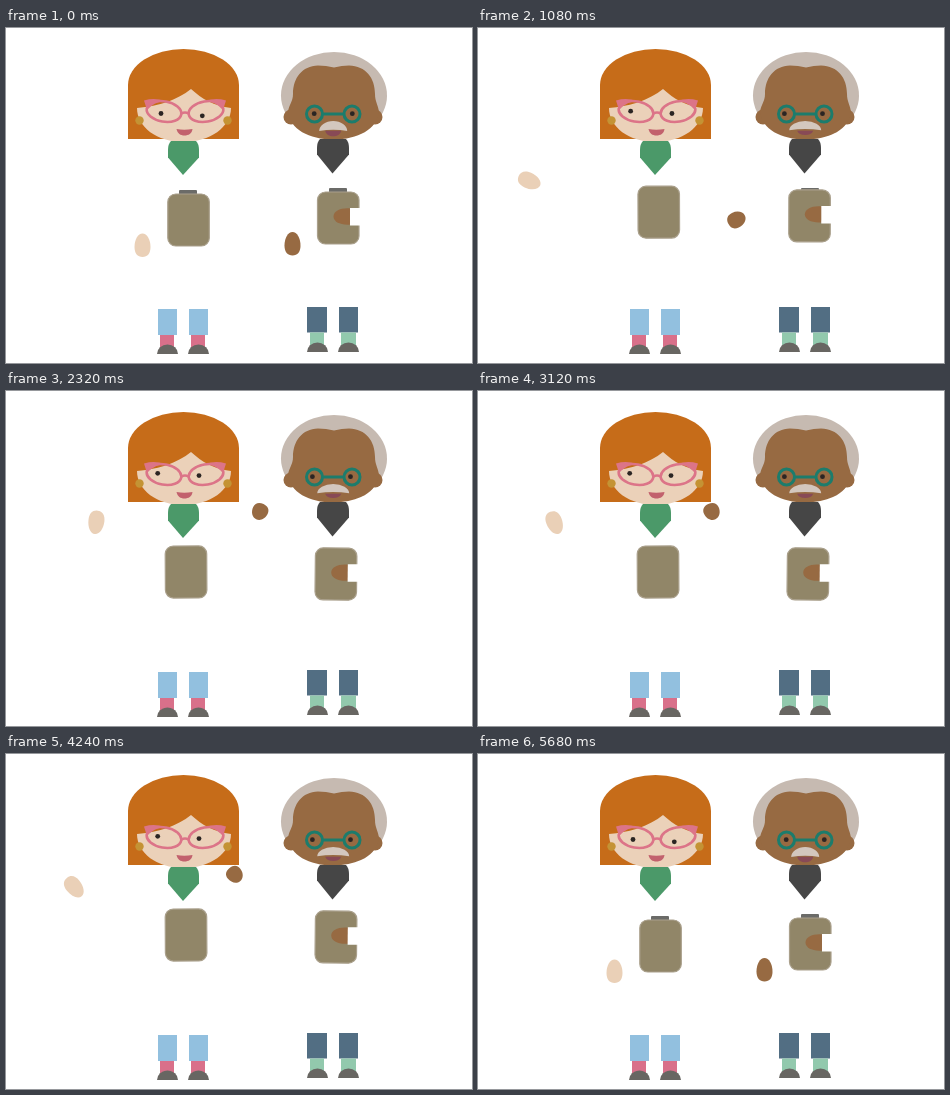
An HTML page for the animation above (6000 ms loop, 466 by 335 pixels).

```html
<!DOCTYPE html>
<html lang="en">
<head>
<meta charset="utf-8">
<title>Waving pair</title>
<style>
html, body { margin: 0; width: 100%; height: 100%; overflow: hidden; background: #fff; }
svg { display: block; width: 466px; height: 335px; }
</style>
</head>
<body>
<svg viewBox="0 0 466 335">
  <defs>
    <path id="hand" d="M0-12C4.500-12 8-6 8 1.500C8 8 5 11.500 0 11.500S-8 8-8 1.500C-8-6-4.500-12 0-12Z"/>
    <path id="shoe" d="M0 9.500A10.500 9.500 0 0 1 21 9.500Z" fill="#686662"/>
    <rect id="bag" width="41.500" height="52" rx="8" fill="#918668" stroke="#aaa08c" stroke-width="1.200"/>
    <rect id="tab" width="18" height="7" rx="1" fill="#6b6b68"/>
    <g id="lens">
      <ellipse cx="158" cy="83.500" rx="17.500" ry="10.200" transform="rotate(10 158 83.500)" fill="none" stroke="#dc7488" stroke-width="2.600"/>
      <path d="M138 72.500Q149 69.500 158 73Q148 74 141 82Z" fill="#dc7488"/>
    </g>
  </defs>

  <g id="woman">
    <path fill="#c66c19" d="M122 111V57A55.500 36 0 0 1 233 57V111Z"/>
    <path fill="#ebd1b9" d="M185 61C171 72 154 78 131 80C131 99 151 114 177.500 114S225 99 225 80C208 78 196 71 185 61Z"/>
    <g fill="#c49334"><circle cx="133.500" cy="92.500" r="4.200"/><circle cx="221.500" cy="92.500" r="4.200"/></g>
    <g id="womanEyes" fill="#2b2523"><circle cx="155" cy="85.500" r="2.400"/><circle cx="196.300" cy="87.800" r="2.400"/></g>
    <use href="#lens"/><use href="#lens" transform="translate(358 0) scale(-1 1)"/>
    <path fill="none" stroke="#dc7488" stroke-width="2.400" d="M175.500 85.500Q179 83.500 182.500 85.500"/>
    <path fill="#c2616d" d="M170.500 101Q178 102.500 186.500 101C186 105.500 182.500 107.500 178.500 107.500S171.500 105.500 170.500 101Z"/>
    <path fill="#4b9969" d="M165 113H190Q193 116 193 122V129.500L177 147L162 129.500V122Q162 116 165 113Z"/>
    <use href="#tab" x="173" y="162"/>
    <use href="#bag" x="161.800" y="166" id="womanBag"/>
    <path fill="#92c0df" d="M152 281H171V307H152ZM183 281H202V307H183Z"/>
    <path fill="#d9708a" d="M154 307H168V320H154ZM185 307H199V320H185Z"/>
    <use href="#shoe" x="151" y="316.500"/><use href="#shoe" x="182" y="316.500"/>
    <use href="#hand" id="womanHand" fill="#ead0b7"/>
  </g>

  <g id="man">
    <ellipse cx="328" cy="67.500" rx="53" ry="43.500" fill="#c6bab1"/>
    <g fill="#976a42">
      <circle cx="285" cy="89" r="7.500"/><circle cx="369" cy="89" r="7.500"/>
      <path d="M282 84C283 76 287 74 287 66C287 50 296 38 312 37.500Q320 37.500 328 39.500Q336 37.500 343 37.500C360 38 369 50 369 66C369 74 372 76 373 84C371 101 352 111.500 327.500 111.500S284 101 282 84Z"/>
    </g>
    <g id="manEyes" fill="#2b2523"><circle cx="308.200" cy="85.700" r="2.400"/><circle cx="346.300" cy="85.700" r="2.400"/></g>
    <g fill="none" stroke="#1c7c6c" stroke-width="3">
      <circle cx="308.500" cy="86" r="8"/><circle cx="346" cy="86" r="8"/>
      <path d="M316.500 86H338"/>
    </g>
    <path id="manMouth" fill="#884a56" d="M-8 0H8C7 4 4 5.500 0 5.500S-7 4-8 0Z"/>
    <path id="tache" fill="#d3c7be" d="M-14 10A14 10 0 0 1 14 10Q0 7.500-14 10Z"/>
    <path fill="#464646" d="M314 111H340Q343 114 343 120V126.500L326.500 145.500L311 126.500V120Q311 114 314 111Z"/>
    <use href="#tab" x="323" y="160"/>
    <g id="manBag">
      <use href="#bag" x="311.500" y="164"/>
      <path fill="#976a42" d="M344.500 180.500C335 179.500 327.500 183 327.500 188.500S335 197.500 344.500 196.500Z"/>
      <path fill="#fff" d="M344 180H355V197.500H344Z"/>
    </g>
    <path fill="#526e83" d="M301 279H321V304.500H301ZM333 279H352V304.500H333Z"/>
    <path fill="#92c9ad" d="M304 304.500H318V318H304ZM335 304.500H350V318H335Z"/>
    <use href="#shoe" x="301" y="314.500"/><use href="#shoe" x="332" y="314.500"/>
    <use href="#hand" id="manHand" fill="#976a42"/>
  </g>
</svg>
<script>
const LOOP = 6000, STEP = 40, TURN = 2 * Math.PI;

// Both arms share one lifting path; the man stands to the right of the woman
const woman = { x: 0, y: 0, top: 178, up: 200, down: 4370, rest: 5670,
  shiftX: 0, shiftY: 0, swing: 29, twist: 60, drop: 5, period: 1700, phase: 1510, sleeve: 0 };
const man = { x: 150, y: -1.5, top: 173, up: 690, down: 4500, rest: 5330,
  shiftX: 5, shiftY: -9, swing: 13, twist: 33, drop: 0, period: 1250, phase: 3237, sleeve: .28 };

const part = (t, from, to) => Math.min(1, Math.max(0, (t - from) / (to - from)));
const smooth = x => x * x * (3 - 2 * x);
// Eases up to 1, stays, then settles back to 0
const hold = (t, up, full, down, rest) =>
  smooth(part(t, up, full)) * (1 - part(t, down, rest)) ** 2;
const bend = (a, b, c, u) => a * (1 - u) ** 2 + 2 * b * u * (1 - u) + c * u * u;

const place = (id, value) => document.getElementById(id).setAttribute("transform", value);

function moveHand(id, arm, t) {
  const u = hold(t, arm.up, arm.up + 1400, arm.down, arm.rest);
  const wave = Math.sin(TURN * (t - arm.phase) / arm.period);
  const x = arm.x + bend(136.5, 40, 86, u) + u * (arm.shiftX + arm.swing * wave);
  const y = arm.y + bend(217.5, 154, 131, u) + u * (arm.shiftY + arm.drop * wave * wave);
  const angle = arm.top * u ** .6 + u * u * arm.twist * wave;
  const length = 1 - arm.sleeve * Math.min(1, 4 * u);
  place(id, `translate(${x} ${y}) rotate(${angle}) scale(1 ${length})`);
}

function draw(t) {
  const w = hold(t, 350, 1480, 4880, 5680);
  const m = hold(t, 850, 1480, 4690, 5320);
  const look = hold(t, 220, 640, 5330, 5680);
  moveHand("womanHand", woman, t);
  moveHand("manHand", man, t);
  place("womanBag", `translate(${-2.5 * w} ${-11 * w}) rotate(${-.3 * w} 182 192)`);
  place("manBag", `translate(${-2.3 * m} ${-7 * m}) rotate(${.6 * m} 332 190)`);
  place("womanEyes", `translate(${-3.3 * w} ${-3.2 * w})`);
  place("manEyes", `translate(${-1.8 * look} 0)`);
  place("tache", `translate(327.2 93) scale(${1 + .14 * look} ${1 - .08 * look})`);
  place("manMouth", `translate(327.2 102.8) scale(1 ${1 - .25 * look})`);
}

function tick() {
  draw(Math.floor(performance.now() % LOOP / STEP) * STEP);
  requestAnimationFrame(tick);
}
tick();
</script>
</body>
</html>
```
